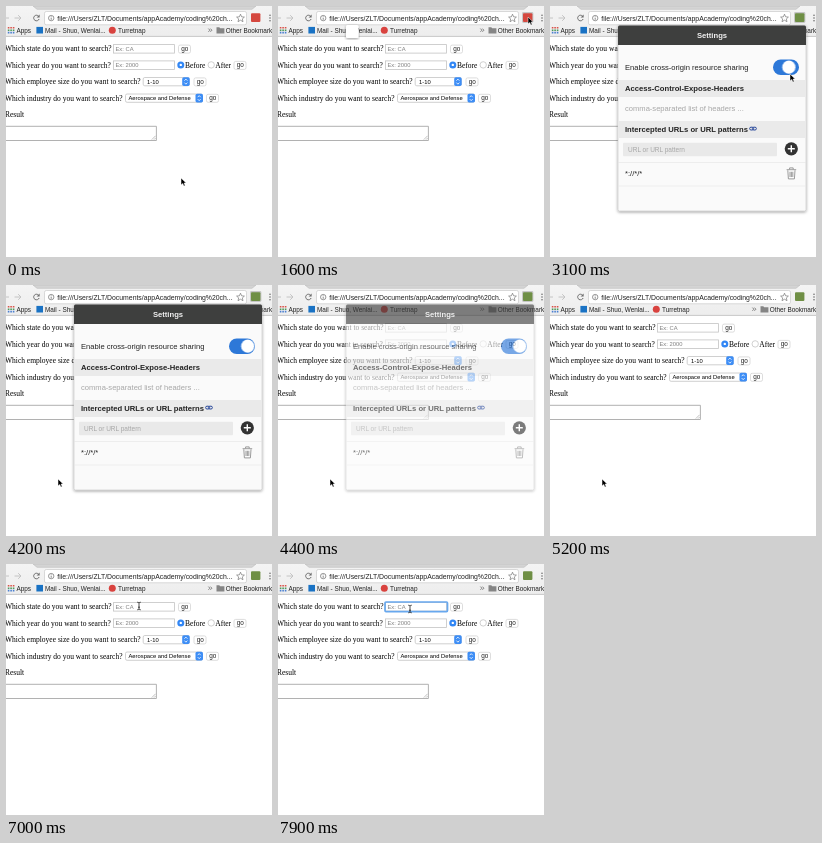
Animation, 266 px wide and 251 px high, one loop 8000 ms. Source, as an HTML page:

```html
<!DOCTYPE html>
<html lang="en">
<head>
<meta charset="utf-8">
<title>Enabling cross-origin requests</title>
<style>
html, body { margin: 0; width: 100%; height: 100%; overflow: hidden; background: #fff; }
svg { display: block; width: 266px; height: 251px; }
text { font: 6.4px "Liberation Sans", Arial, sans-serif; fill: #222; white-space: pre; }
.page text { font: 7.5px "Liberation Serif", Times, serif; fill: #000; }
.page .ui { font: 5.8px "Liberation Sans", Arial, sans-serif; }
.page .hint { font: 5.8px "Liberation Sans", Arial, sans-serif; fill: #7d7d7d; }
.field { fill: #fff; stroke: #c4c4c4; stroke-width: .8; }
.popup text { font-size: 7.58px; }
.popup .bold { font-weight: bold; font-size: 7.65px; }
.popup .soft { fill: #a6a6a6; }
.popup .title { fill: #f2f2f2; }
.line { fill: none; stroke: #6b6b6b; stroke-width: 1; }
.faint { stroke: #c4c4c4; }

/* One shared 8 s clock; moves advance every 100 ms. */
.pointer, .arrow, .beam, .popup, .seed, .pressed, .icon, .knob, .track, .reload, .stop, .dot, .ring {
  animation: 8s step-end infinite;
}
.pointer { animation-name: travel; }
.arrow { animation-name: arrow; }
.beam { animation-name: beam; }
.popup { animation-name: popup; }
.seed { animation-name: seed; }
.pressed { animation-name: pressed; }
.icon { animation-name: icon; }
.knob { animation-name: knob; }
.track { animation-name: track; }
.reload { animation-name: reload; }
.stop { animation-name: stop; }
.dot { animation-name: dot; }
.ring { animation-name: ring; }

@keyframes travel {
  0% { transform: translate(175px, 172px); }
  5% { transform: translate(175px, 172px); animation-timing-function: steps(3, start); }
  8.75% { transform: translate(203px, 108px); animation-timing-function: steps(3, start); }
  12.5% { transform: translate(242px, 27px); animation-timing-function: steps(2, start); }
  15% { transform: translate(250px, 11px); }
  27.5% { transform: translate(250px, 43px); animation-timing-function: step-end; }
  28.75% { transform: translate(250px, 43px); animation-timing-function: steps(4, start); }
  33.75% { transform: translate(240px, 68px); }
  40% { transform: translate(240px, 68px); animation-timing-function: steps(4, start); }
  45% { transform: translate(241px, 140px); }
  46.25% { transform: translate(241px, 140px); animation-timing-function: steps(6, start); }
  53.75% { transform: translate(52px, 194px); }
  73.75% { transform: translate(52px, 194px); animation-timing-function: steps(5, start); }
  80% { transform: translate(112px, 77px); animation-timing-function: steps(4, start); }
  85% { transform: translate(126px, 54px); animation-timing-function: steps(3, start); }
  88.75% { transform: translate(133px, 42px); }
  92.5% { transform: translate(133px, 42px); animation-timing-function: steps(3, start); }
  96.25%, 100% { transform: translate(132px, 45px); }
}
@keyframes arrow { 0% { opacity: 1; } 78.75%, 100% { opacity: 0; } }
@keyframes beam { 0% { opacity: 0; } 78.75%, 100% { opacity: 1; } }
@keyframes seed { 0% { opacity: 0; } 20% { opacity: 1; } 21.25%, 100% { opacity: 0; } }
@keyframes popup {
  0% { opacity: 0; }
  21.25% { opacity: 1; }
  55% { opacity: .65; }
  56.25% { opacity: .25; }
  57.5%, 100% { opacity: 0; }
}
@keyframes pressed { 0% { opacity: 0; } 16.25% { opacity: 1; } 57.5%, 100% { opacity: 0; } }
@keyframes icon { 0% { fill: #d5483f; } 38.75%, 100% { fill: #6f8f45; } }
@keyframes knob {
  0% { transform: translateX(0); }
  36.25% { transform: translateX(0); animation-timing-function: steps(4, start); }
  41.25%, 100% { transform: translateX(11.4px); }
}
@keyframes track { 0% { fill: #e0e0e0; } 36.25%, 100% { fill: #2d78d8; } }
@keyframes reload { 0% { opacity: 1; } 66.25% { opacity: 0; } 67.5%, 100% { opacity: 1; } }
@keyframes stop { 0% { opacity: 0; } 66.25% { opacity: 1; } 67.5%, 100% { opacity: 0; } }
@keyframes dot { 0% { opacity: 1; } 66.25% { opacity: .6; } 67.5%, 100% { opacity: 1; } }
@keyframes ring { 0% { opacity: 0; } 98.75%, 100% { opacity: 1; } }
</style>
</head>
<body>
<svg viewBox="0 0 266 251">
  <defs>
    <g id="go">
      <rect x=".5" y=".5" width="12" height="8" rx="1.6" fill="#fff" stroke="#cfcfcf" stroke-width=".7"/>
      <text class="ui" x="3.3" y="6.4">go</text>
    </g>
    <g id="stepper">
      <rect width="7.5" height="8.6" rx="1.6" fill="#3d8df5"/>
      <path d="M2.2 3.4l1.5-1.6 1.5 1.6M2.2 5.3l1.5 1.6 1.5-1.6" fill="none" stroke="#fff" stroke-width=".8"/>
    </g>
    <linearGradient id="bar" x2="0" y2="1">
      <stop stop-color="#f4f4f4"/><stop offset="1" stop-color="#ededed"/>
    </linearGradient>
    <filter id="shadow" x="-10%" y="-10%" width="120%" height="120%">
      <feDropShadow dx="0" dy="1" stdDeviation="1.6" flood-opacity=".4"/>
    </filter>
  </defs>

  <rect width="266" height="251" fill="#fff"/>

  <g class="page">
    <text x="-1" y="45.2">Which state do you want to search?</text>
    <rect class="field" x="107.5" y="38.6" width="61" height="8.5"/>
    <text class="hint" x="109.5" y="45.1">Ex: CA</text>
    <use href="#go" x="172" y="38.6"/>

    <text x="-1" y="61.5">Which year do you want to search?</text>
    <rect class="field" x="107.5" y="54.9" width="61" height="8.5"/>
    <text class="hint" x="109.5" y="61.4">Ex: 2000</text>
    <g class="dot">
      <circle cx="174.8" cy="58.9" r="3.5" fill="#3287f5"/>
      <circle cx="174.8" cy="58.9" r="1.2" fill="#fff"/>
    </g>
    <text x="179" y="61.5">Before</text>
    <circle class="field" cx="205.2" cy="58.9" r="3.2"/>
    <text x="209.3" y="61.5">After</text>
    <use href="#go" x="227.5" y="54.9"/>

    <text x="-1" y="78.2">Which employee size do you want to search?</text>
    <rect class="field" x="137.2" y="71.5" width="46" height="8.3" rx="1.6"/>
    <text class="ui" x="141" y="77.8">1-10</text>
    <use href="#stepper" x="176.2" y="71.3"/>
    <use href="#go" x="187.5" y="71.4"/>

    <text x="-1" y="94.5">Which industry do you want to search?</text>
    <rect class="field" x="119.5" y="88" width="77" height="8.3" rx="1.6"/>
    <text class="ui" x="122.5" y="94.2">Aerospace and Defense</text>
    <use href="#stepper" x="189.5" y="87.8"/>
    <use href="#go" x="200" y="87.8"/>

    <text x="-1" y="110.5">Result</text>
    <path d="M-1 120.3H150.4V134.5H-1" fill="#fff" stroke="#a9a9a9" stroke-width=".9"/>
    <path d="M145.8 133.6l3.8-3.8M148 133.6l1.6-1.6" stroke="#999" stroke-width=".6"/>
    <rect class="ring" x="107" y="38" width="62.5" height="9.6" rx="1" fill="none" stroke="#68a8ee" stroke-width="1.7"/>
  </g>

  <g class="browser">
    <rect width="266" height="30.5" fill="url(#bar)"/>
    <path d="M27 0L31 3.3H246L250 0Z" fill="#d4d4d4" stroke="#b9b9b9" stroke-width=".6"/>
    <path d="M0 30.4H266" stroke="#bdbdbd" stroke-width=".8"/>
    <path class="line faint" d="M-1 12H3M8.5 12H15M12.2 9.2L15 12L12.2 14.8"/>
    <g class="reload">
      <path class="line" d="M32.6 10.2A2.8 2.8 0 1 0 33.1 13"/>
      <path d="M33.6 8.5V11.5H30.6Z" fill="#6b6b6b"/>
    </g>
    <path class="line stop" d="M28 9.2l5.4 5.4m0-5.4l-5.4 5.4"/>
    <rect x="38.5" y="5.5" width="202" height="13.3" rx="1.8" fill="#fff" stroke="#cacaca" stroke-width=".7"/>
    <circle class="line" cx="45.2" cy="12.1" r="2.7" style="stroke-width:.7"/>
    <path d="M45.2 10.4v.8m0 .6v2" stroke="#6b6b6b" stroke-width=".8"/>
    <text x="51.3" y="14.7" style="font-size:6.86px">file:///Users/ZLT/Documents/appAcademy/coding%20ch...</text>
    <path d="M234.5 8.2l1.1 2.6 2.8.3-2.1 1.8.7 2.8-2.5-1.5-2.5 1.5.7-2.8-2.1-1.8 2.8-.3z" fill="none" stroke="#777" stroke-width=".7"/>
    <rect class="pressed" x="244" y="6" width="11.4" height="11" rx="1.4" fill="#c6c6c6"/>
    <rect class="icon" x="245" y="7.2" width="9.4" height="8.8" rx="1"/>
    <g fill="#6b6b6b">
      <circle cx="264" cy="9.2" r=".8"/><circle cx="264" cy="12" r=".8"/><circle cx="264" cy="14.8" r=".8"/>
    </g>

    <g stroke-width="1.6" stroke-dasharray="1.6 .9">
      <path d="M1.8 21.8h6.6" stroke="#d9534a"/>
      <path d="M1.8 24.2h6.6" stroke="#4b9a5a"/>
      <path d="M1.8 26.6h6.6" stroke="#4a7fd0"/>
    </g>
    <text x="10.4" y="26.6">Apps</text>
    <rect x="30.4" y="20.9" width="6.6" height="6.6" fill="#1972c4"/>
    <text x="39" y="26.6">Mail - Shuo, Wenlai...</text>
    <circle cx="106.3" cy="24.2" r="3.5" fill="#d9433f"/>
    <text x="112" y="26.6">Turretnap</text>
    <path d="M202.4 22.6l1.5 1.6-1.5 1.6m2-3.2l1.5 1.6-1.5 1.6" fill="none" stroke="#555" stroke-width=".7"/>
    <path d="M210.5 21.2h2.8l.9 1h4.2v5.2h-7.9z" fill="#858585"/>
    <text x="219.7" y="26.6">Other Bookmarks</text>
  </g>

  <rect class="seed" x="68" y="19" width="12.5" height="13" rx="1.5" fill="#fff" filter="url(#shadow)"/>

  <g class="popup">
    <rect x="68" y="19.5" width="188" height="185.5" rx="1.5" fill="#fafafa" stroke="#bbb" stroke-width=".5" filter="url(#shadow)"/>
    <path d="M68 39V21q0-1.5 1.5-1.5H254.5q1.5 0 1.5 1.5V39z" fill="#3e3f3e"/>
    <path d="M68 74h188v17H68zM68 115h188v17H68z" fill="#eaeaea"/>
    <path d="M68 156.5h188M68 180h188" stroke="#e4e4e4" stroke-width=".6"/>
    <text class="bold title" x="162" y="32.2" text-anchor="middle">Settings</text>
    <text x="75" y="64.2">Enable cross-origin resource sharing</text>
    <rect class="track" x="223" y="53.5" width="26" height="15.4" rx="7.7"/>
    <circle class="knob" cx="230.3" cy="61.2" r="6.6" fill="#fff"/>
    <text class="bold" x="75" y="84.9">Access-Control-Expose-Headers</text>
    <text class="soft" x="75" y="104.6">comma-separated list of headers ...</text>
    <text class="bold" x="75" y="125.8">Intercepted URLs or URL patterns</text>
    <g fill="none" stroke="#2b4a9b" stroke-width="1">
      <rect x="199.6" y="121.2" width="4" height="2.8" rx="1.4"/>
      <rect x="202.4" y="121.2" width="4" height="2.8" rx="1.4"/>
    </g>
    <rect x="73" y="136.8" width="154" height="13.5" rx="1" fill="#e9e9e9"/>
    <text class="soft" x="78" y="146" style="font-size:6.5px">URL or URL pattern</text>
    <circle cx="241.3" cy="142.8" r="6.6" fill="#333"/>
    <path d="M237.8 142.8h7M241.3 139.3v7" stroke="#fff" stroke-width="1.4"/>
    <text x="75" y="170.2">*://*/*</text>
    <path d="M237.8 164.3l.6 8.6h6l.6-8.6M236.6 163.7h9.6M239.6 163.4v-1.5h3.6v1.5M240 165.8v5.2m1.4-5.2v5.2m1.4-5.2v5.2" fill="none" stroke="#858585" stroke-width=".8"/>
  </g>

  <g class="pointer">
    <path class="arrow" d="M0 0V7L1.7 5.5 2.9 8.1 4.2 7.5 3 5H5.2Z" fill="#000" stroke="#fff" stroke-width=".5"/>
    <path class="beam" d="M-1.8-3.8Q0-3.8 0-2.8Q0-3.8 1.8-3.8M0-2.8V2.8M-1.8 3.8Q0 3.8 0 2.8Q0 3.8 1.8 3.8M-1 1.2H1" fill="none" stroke="#222" stroke-width=".8"/>
  </g>
</svg>
</body>
</html>
```
